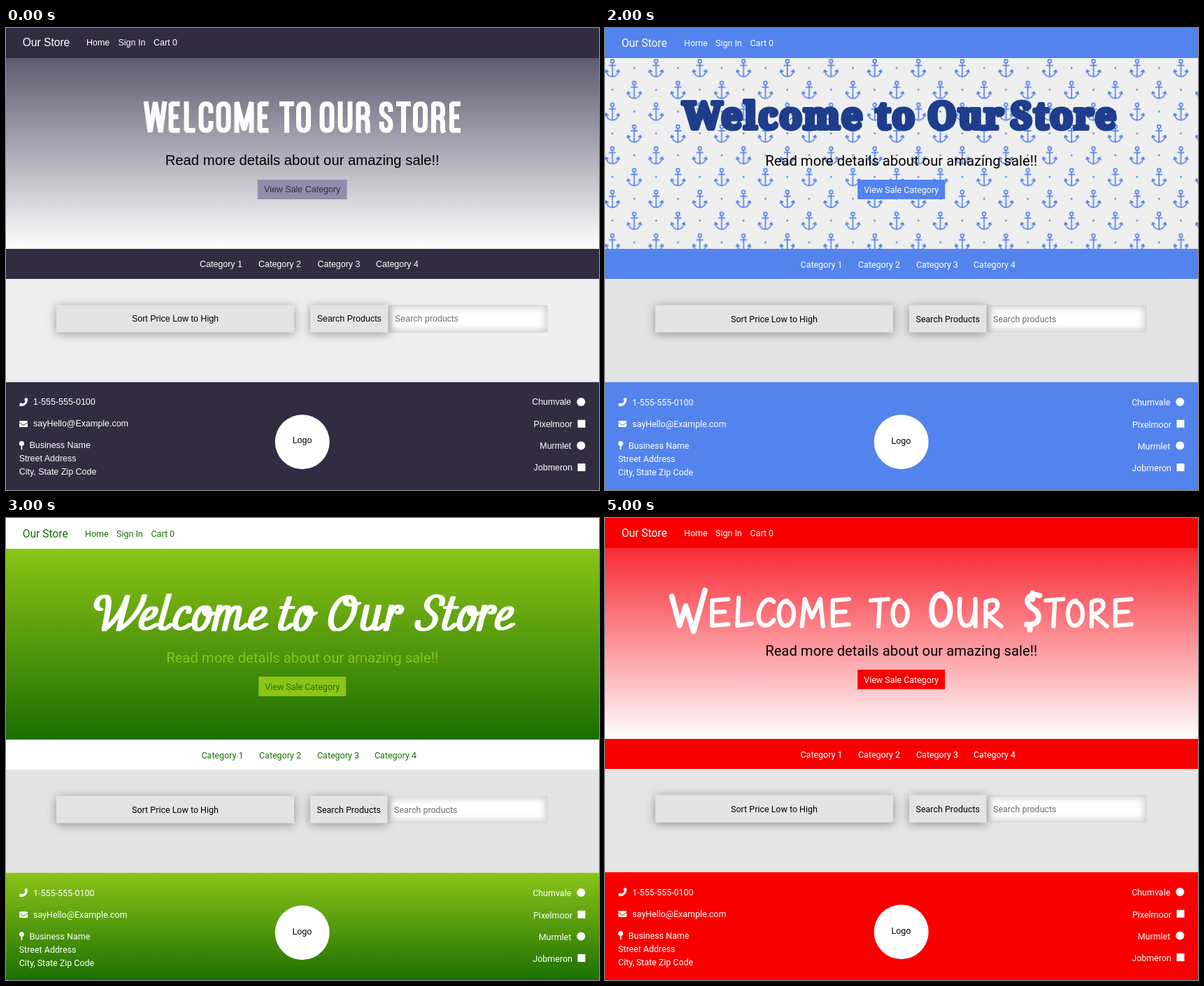
An HTML page that plays this animation: 848 by 661 pixels, repeating every 6000 ms.

```html
<!DOCTYPE html>
<html lang="en">
<head>
<meta charset="utf-8">
<title>Store themes</title>
<style>
html, body { margin: 0; width: 100%; height: 100%; overflow: hidden; background: #fff; }
.theme {
  position: absolute; left: 0; top: 0; width: 848px; height: 661px;
  font-size: 12.48px; opacity: 0;
  animation: turn 6s step-end infinite;
}
@keyframes turn {
  0% { opacity: 1; }
  16.6666%, 100% { opacity: 0; }
}
.helvetica text { transform: translateY(-1px); }
.brand { font-size: 15.6px; }
.lead { font-size: 20.28px; }
.mid { text-anchor: middle; }
.end { text-anchor: end; }
.raised { filter: drop-shadow(0 2px 7px rgba(0, 0, 0, .38)); }
.inset { fill: none; stroke: #d2d2d2; stroke-width: 9px; filter: blur(4px); }
.strokes { fill: none; stroke: #fff; stroke-linejoin: bevel; }
.round { stroke-linecap: round; stroke-linejoin: round; }
.chunky {
  font: 700 53px "Noto Serif", serif; letter-spacing: 2px; fill: #1e3d8c;
  stroke: #1e3d8c; stroke-width: 6px; stroke-linejoin: round;
}
.gears g { filter: drop-shadow(2px 4px 4px #000); }
.grain { mix-blend-mode: overlay; opacity: .55; }
</style>
</head>
<body>
<script>
const { sin, cos, PI, atan2 } = Math;
const TITLE = ['Welcome', 'to', 'Our', 'Store'];
const range = n => [...Array(n).keys()];
const fix = (...v) => v.map(n => n.toFixed(1)).join(' ');
const path = (d, attrs = '') => `<path d="${d}" ${attrs}/>`;
const rect = (x, y, w, h, fill, attrs = '') =>
  `<rect x="${x}" y="${y}" width="${w}" height="${h}" fill="${fill}" ${attrs}/>`;
const circle = (x, y, r, fill, attrs = '') =>
  `<circle cx="${x}" cy="${y}" r="${r}" fill="${fill}" ${attrs}/>`;
const text = (x, y, words, fill, cls = '') =>
  `<text x="${x}" y="${y}" fill="${fill}" class="${cls}">${words}</text>`;
const stops = colors => colors.map((c, i) =>
  `<stop offset="${i / (colors.length - 1)}" stop-color="${c}"/>`).join('');
const fade = (id, ...colors) => `<linearGradient id="${id}" x2="0" y2="1">${stops(colors)}</linearGradient>`;
const glow = (id, ...colors) => `<radialGradient id="${id}">${stops(colors)}</radialGradient>`;

// Lettering: each glyph is [advance, centre line], drawn up from the baseline.
const condensed = {
  W: [35, 'M3 -45L9 -1L16.5 -44L24 -1L30 -45'],
  E: [22, 'M16.5 -41.5H4V-3.5H16.5M4 -23H14.5'],
  L: [21, 'M4 -45V-3.5H16.5'],
  C: [25, 'M18 -28V-33Q18 -41.5 11 -41.5T4 -33V-12Q4 -3.5 11 -3.5T18 -12V-17'],
  O: [26, 'M4 -33Q4 -41.5 11 -41.5T18 -33V-12Q18 -3.5 11 -3.5T4 -12Z'],
  M: [33, 'M4 0V-44L14.5 -4L25 -44V0'],
  T: [23.5, 'M0 -41.5H21M10.5 -41.5V0'],
  U: [26, 'M4 -45V-12Q4 -3.5 11 -3.5T18 -12V-45'],
  R: [26, 'M4 0V-41.5H10Q17 -41.5 17 -33V-30Q17 -22 10 -22H4M10 -22Q17 -22 17 -13V-4L18.5 0'],
  S: [25, 'M17 -30V-33Q17 -41.5 10.5 -41.5T4 -33Q4 -27 10.5 -23T17 -12Q17 -3.5 10.5 -3.5T4 -12V-16']
};
const brush = {
  W: [45, 'M2 -35L11 -2L18 -24L27 5L40 -42'],
  E: [37, 'M27 -40L4 -38V-2L27 -4M4 -21L22 -22'],
  L: [30, 'M5 -42L3 -2L24 -5'],
  C: [30, 'M25 -36C14 -48 0 -24 4 -10C8 2 20 -2 25 -10'],
  O: [32.5, 'M14 -38C-2 -36 0 -2 12 -2C28 -2 28 -38 10 -36'],
  M: [43, 'M3 -1L7 -40L17 -14L29 -40L33 -1'],
  T: [31, 'M2 -38L27 -40M15 -39L13 -1'],
  U: [36, 'M3 -40C0 -8 6 -2 13 -2S26 -14 25 -40V-1'],
  R: [34, 'M4 -1V-36C26 -46 26 -22 6 -18L26 -1'],
  S: [23.5, 'M18 -36C4 -40 0 -28 9 -22C22 -16 18 0 3 -3M10 -39V-32M7 -2V3']
};
const scriptCaps = {
  W: [61, 'M3 -31C-9 -34 -6 -52 7 -50C15 -48 14 -20 15 -2C28 -14 36 -34 37 -50C37 -34 35 -16 36 -2C52 -14 62 -34 61 -51'],
  O: [47, 'M22 -50C0 -48 -1 -2 17 -2C38 -2 42 -48 22 -50C16 -40 24 -34 39 -40'],
  S: [36, 'M31 -38C34 -54 11 -55 10 -40C10 -26 29 -28 27 -13C25 1 1 2 3 -14']
};
const scriptLower = {
  e: [27, 'M5 -16C18 -17 22 -24 21 -30C19 -37 7 -34 5 -19C3 -2 14 1 27 -10'],
  l: [21, 'M8 -52L6 -12C6 0 14 -1 21 -10'],
  c: [27, 'M21 -27C22 -38 7 -38 5 -18C4 -2 15 1 27 -10'],
  o: [31, 'M16 -35C2 -35 2 -2 14 -2C27 -2 28 -35 16 -35C15 -24 22 -20 30 -26'],
  m: [50, 'M5 -36V-2M5 -20C9 -38 20 -40 20 -26V-2M20 -20C24 -38 36 -40 35 -24V-10C35 0 43 -1 50 -10'],
  t: [21, 'M9 -48L6 -12C5 0 14 0 21 -10M2 -34H17'],
  u: [35, 'M5 -36V-13C5 1 17 0 22 -10M22 -36V-12C22 0 29 0 35 -10'],
  r: [24, 'M5 -36V-2M5 -18C8 -36 16 -40 20 -32C21 -27 18 -25 16 -27']
};

function letters(glyphs, starts, initial = 1) {
  return TITLE.map((word, i) => {
    let x = starts[i];
    return [...word].map(c => {
      const size = c < 'a' ? initial : 1;
      const [advance, d] = glyphs[c] || glyphs[c.toUpperCase()];
      const shape = path(d, `transform="translate(${x}) scale(${size})"`);
      x += advance * size;
      return shape;
    }).join('');
  }).join('');
}
const lettering = (place, width, body, cls = '') =>
  `<g role="img" aria-label="${TITLE.join(' ')}" class="strokes ${cls}" stroke-width="${width}" transform="${place}">${body}</g>`;

const condensedTitle = place => lettering(place, 7, letters(condensed, [0, 194, 251, 336]));
const brushTitle = lettering('translate(93 156)', 6.2, letters(brush, [0, 285, 371, 506], 1.25), 'round');
// A broad nib: the same thin line repeated sideways.
const nibLine = letters({ ...scriptCaps, ...scriptLower }, [1, 261, 332, 459]);
const scriptTitle = lettering('translate(124 161) skewX(-13)', 4,
  [-2, 0, 2].map(dx => `<g transform="translate(${dx})">${nibLine}</g>`).join(''), 'round');
const chunkyTitle = [111, 387, 461, 580].map((x, i) => `<text class="chunky" x="${x}" y="144">${TITLE[i]}</text>`).join('');

// Foliage
function leaflet(x, y, a, len, w, bend) {
  const mx = x + cos(a) * len * .45, my = y + sin(a) * len * .45;
  const tip = fix(x + cos(a + bend) * len, y + sin(a + bend) * len);
  const dx = -sin(a) * w, dy = cos(a) * w;
  return `M${fix(x, y)}Q${fix(mx + dx, my + dy)} ${tip}Q${fix(mx - dx, my - dy, x, y)}`;
}
const blades = (d, fill) => path(d, `fill="${fill}" stroke="#7c8a3c" stroke-width=".5"`);
function frond([x0, y0], [x1, y1], [x2, y2], n, len, spread, near, far = near) {
  const side = s => range(n).map(i => {
    const t = i / (n - 1), u = 1 - t;
    const x = u * u * x0 + 2 * u * t * x1 + t * t * x2;
    const y = u * u * y0 + 2 * u * t * y1 + t * t * y2;
    const a = atan2(u * (y1 - y0) + t * (y2 - y1), u * (x1 - x0) + t * (x2 - x1));
    return leaflet(x, y, a + s * spread, len * (.55 + .45 * sin(PI * t)), 6.5, -s * .15);
  }).join('');
  return blades(side(-1), near) + blades(side(1), far) +
    path(`M${x0} ${y0}Q${x1} ${y1} ${x2} ${y2}`, 'fill="none" stroke="#a3a948" stroke-width="3"');
}
const fan = (x, y, from, to, n, len, fill) =>
  blades(range(n).map(i => leaflet(x, y, from + (to - from) * i / (n - 1), len * (1 - .2 * (i % 2)), 9, .12)).join(''), fill);
function monstera(x, y, size, turn, fill, gapFill) {
  const sides = range(5).flatMap(k => [-1, 1].map(s => [s, k * .36 - .75]));
  const slits = sides.map(([s, v]) => {
    const inner = s * .42, lift = v - .16;
    return `M${fix(s * 1.2, v + .2)}Q${s * .7} ${v + .02} ${inner} ${lift}Q${s * .7} ${v - .14} ${s * 1.2} ${v + .02}Z`;
  }).join('');
  const veins = sides.map(([s, v]) => `M0 ${v - .1}Q${s * .45} ${v - .05} ${s * .85} ${v + .2}`).join('');
  return `<g transform="translate(${x} ${y}) rotate(${turn}) scale(${size})">` +
    path('M0 -.55C.3 -1 1 -.8 1 -.1C1 .5 .4 .8 0 1.1C-.4 .8 -1 .5 -1 -.1C-1 -.8 -.3 -1 0 -.55Z', `fill="${fill}"`) +
    path(slits, `fill="${gapFill}"`) +
    path('M0 -.55V1' + veins, 'fill="none" stroke="#8aa873" stroke-opacity=".5" stroke-width=".015"') + '</g>';
}
const jungle = `<linearGradient id="pink">${stops(['#f8eef0', '#f1cfd6', '#e3a9b6', '#c98494', '#a9636f'])}</linearGradient>` +
  glow('glossy', '#5f8a48', '#2f5a20', '#152c0b') + glow('shady', '#3a4a20', '#26350f', '#141f08') +
  rect(0, 43, 848, 273, 'url(#pink)') +
  frond([520, 330], [680, 220], [860, 120], 16, 130, .8, '#a0586a') +
  monstera(560, 62, 88, 68, 'url(#shady)', '#d893a3') +
  monstera(745, 95, 125, 25, 'url(#shady)', '#b87484') +
  monstera(15, 290, 80, 40, 'url(#glossy)', '#f0dce0') +
  monstera(115, 255, 108, -28, 'url(#glossy)', '#efd0d5') +
  monstera(795, 318, 66, 100, 'url(#glossy)', '#b87484') +
  monstera(690, 308, 46, -70, 'url(#glossy)', '#c98494') +
  fan(345, 165, 3.35, 4.3, 15, 290, '#46561f') +
  frond([228, 30], [290, 110], [365, 205], 15, 170, .75, '#3b4b18', '#66742f') +
  fan(338, 165, 1.3, 2.7, 20, 180, '#26310f') +
  frond([385, 335], [355, 250], [335, 160], 14, 85, 2.2, '#2b3611') +
  frond([400, 215], [600, 268], [860, 318], 28, 235, .9, '#33451a', '#4d5e22');

// Nautical wallpaper
const anchor = (x, y) => `<g transform="translate(${x} ${y})" fill="none" stroke="#5383ec" stroke-width="1.7">` +
  circle(0, -10, 2.4, 'none') +
  path('M0 -7.5V12M-5 -4H5M-9 3C-8 15 8 15 9 3M-10.5 6L-9 2.5L-5.5 5M10.5 6L9 2.5L5.5 5') + '</g>';
const dot = (x, y) => rect(x - 1.2, y - 1.2, 2.4, 2.4, '#5383ec');
const anchors = `<pattern id="anchors" x="-5.1" y="42" width="62.54" height="62.4" patternUnits="userSpaceOnUse">` +
  anchor(15.6, 15.6) + anchor(46.9, 46.8) + dot(46.9, 15.2) + dot(15.6, 46.4) + '</pattern>' +
  rect(0, 43, 848, 273, '#efefef') + rect(0, 43, 848, 273, 'url(#anchors)');

// Machinery
const ring = (x, y, r) => `M${fix(x - r, y)}a${r} ${r} 0 1 0 ${2 * r} 0a${r} ${r} 0 1 0 ${-2 * r} 0z`;
function gear(x, y, r, teeth, { holes = 0, spokes = 0, fill = 'url(#metal)' } = {}) {
  const rim = range(teeth * 4).map(i => {
    const a = PI * (i + .5) / (2 * teeth), q = i % 4 < 2 ? r : r * .87;
    return fix(x + q * cos(a), y + q * sin(a));
  }).join('L');
  const cuts = range(holes).map(i => {
    const a = 2 * PI * i / holes - 2.3;
    return ring(x + r * .5 * cos(a), y + r * .5 * sin(a), r * .19);
  }).join('');
  const arms = range(spokes).map(i => {
    const a = 2 * PI * i / spokes + .2;
    return `M${fix(x, y)}L${fix(x + r * .74 * cos(a), y + r * .74 * sin(a))}`;
  }).join('');
  return '<g>' + (holes ? circle(x, y, r * .75, '#0c0b0b') : '') +
    path(`M${rim}Z` + cuts + (spokes ? ring(x, y, r * .72) : ''),
      `fill="${fill}" fill-rule="evenodd" stroke="#7d7975" stroke-width=".7"`) +
    path(arms, `stroke="#55524f" stroke-width="${r * .075}"`) +
    circle(x, y, r * .8, 'none', 'stroke="#2b2927" stroke-width="2"') +
    circle(x, y, r * .2, '#55524f', 'stroke="#1f1d1c" stroke-width="2"') +
    circle(x, y, r * .09, '#474441', 'stroke="#888" stroke-width=".7"') + '</g>';
}
const machine = glow('metal', '#65615e', '#4f4c49', '#3b3836') +
  `<filter id="rust"><feTurbulence type="fractalNoise" baseFrequency=".06" numOctaves="4" seed="3"/>
    <feColorMatrix values="2.4 0 0 0 -.75  2.4 0 0 0 -.75  2.4 0 0 0 -.75  0 0 0 0 1"/></filter>
  <pattern id="plate" width="18" height="18" patternUnits="userSpaceOnUse">` +
  rect(0, 0, 18, 18, '#2a2928') + circle(5, 5, 3.8, '#0c0c0c', 'stroke="#4b4947"') +
  circle(14, 14, 3.8, '#0c0c0c', 'stroke="#4b4947"') + '</pattern>' +
  rect(0, 43, 848, 273, '#131211') + rect(590, 43, 258, 273, 'url(#plate)') + '<g class="gears">' +
  gear(165, 75, 70, 24, { spokes: 6, fill: '#2c2a28' }) + gear(60, 250, 75, 26, { spokes: 5, fill: '#2a2826' }) +
  gear(470, 90, 85, 30, { holes: 5, fill: '#2c2a28' }) +
  gear(378, 42, 132, 40, { spokes: 7 }) +
  gear(230, 185, 48, 18, { fill: '#3b3836' }) +
  gear(655, 30, 55, 18, { holes: 5 }) + gear(838, 25, 68, 20) +
  gear(690, 305, 58, 20, { spokes: 5, fill: '#514039' }) +
  gear(92, 145, 122, 40, { spokes: 9 }) + gear(8, 290, 55, 18, { holes: 5 }) +
  gear(720, 142, 66, 22, { holes: 6 }) + gear(824, 263, 98, 34, { spokes: 10 }) +
  gear(313, 262, 75, 22, { holes: 4 }) + gear(210, 268, 57, 16) +
  gear(543, 262, 108, 30, { holes: 5 }) + '</g>' +
  rect(0, 43, 848, 273, '#888', 'class="grain" filter="url(#rust)"');

const fadeHero = (id, from, to) => fade(id, from, to) + rect(0, 43, 848, 273, `url(#${id})`);

const roboto = { family: 'Roboto, sans-serif', nav: [113, 158, 207.5], cats: [279.5, 362, 445, 527], btn: 125, search: 110.5 };
const helvetica = { family: "'Liberation Sans', sans-serif", nav: [115, 160.5, 211], cats: [277, 361, 445.5, 529], btn: 128, search: 111.5, cls: 'helvetica' };

const themes = [
  { face: helvetica, bar: '#322c42', panel: '#efefef', hero: fadeHero('dusk', '#5d5a70', '#fff'),
    title: condensedTitle('translate(197 150)'), btn: '#928dac', btnInk: '#322c42' },
  { bar: '#0e2806', panel: '#e9e9e9', hero: jungle, title: scriptTitle, catInk: '#f3abb5', drop: 9 },
  { bar: '#5383ec', panel: '#e4e4e4', hero: anchors, title: chunkyTitle },
  { bar: '#fff', ink: '#186f00', panel: '#e4e4e4', hero: fadeHero('lime', '#8cc418', '#1a6e00'), foot: 'url(#lime)',
    title: scriptTitle, lead: '#8cc418', btn: '#8cc418', btnInk: '#1e6f00', drop: 9, shift: 1 },
  { bar: '#6b6b6b', panel: '#e9e9e9', hero: machine, title: condensedTitle('translate(169 157) scale(1.123)'), lead: '#fff', drop: 9 },
  { bar: '#f80000', panel: '#e5e5e5', hero: fadeHero('blush', '#f92a35', '#fff'), title: brushTitle }
];

function form(face) {
  const edge = 435 + face.search;
  return `<svg x="${edge}" y="396.5" width="${774.5 - edge}" height="39">` +
    rect(0, 0, '100%', 39, '#fff', 'rx="3"') +
    '<rect class="inset" width="100%" height="39" rx="3"/>' +
    rect(.5, .5, 773.5 - edge, 38, 'none', 'rx="3" stroke="#ccd0d3"') + '</svg>' +
    rect(72, 396.5, 340, 39, '#e4e4e5', 'class="raised"') +
    rect(435, 396.5, face.search, 39, '#e4e4e5', 'class="raised"') +
    text(242, 420.5, 'Sort Price Low to High', '#000', 'mid') +
    text(435 + face.search / 2, 420.5, 'Search Products', '#000', 'mid') +
    text(edge + 9.5, 421.4, 'Search products', '#656d75');
}

function footer(fill) {
  const social = ['Chumvale', 'Pixelmoor', 'Murmlet', 'Jobmeron'];
  return rect(0, 506.7, 848, 156, fill) +
    path('M19 537.8l3.2-1.6 1.6 1.6q3-1.6 4-4l-1.6-1.6 1.4-3.2 3.4.9q.6 10.6-11.2 11.4z', 'fill="#fff"') +
    rect(19, 562, 12, 9, '#fff', 'rx="1.3"') +
    path('M19 564.5l6 3.8 6-3.8', `fill="none" stroke="${fill}"`) +
    circle(22.4, 594.6, 3.5, '#fff') + rect(21.6, 597, 1.7, 6.3, '#fff') +
    text(39, 540.3, '1-555-555-0100', '#fff') +
    text(39, 571.4, 'sayHello@Example.com', '#fff') +
    ['Business Name', 'Street Address', 'City, State Zip Code'].map((line, i) =>
      text(i ? 18.7 : 33.5, 602.4 + i * 18.8, line, '#fff')).join('') +
    circle(423.7, 592.2, 39, '#fff') + text(423.5, 594.7, 'Logo', '#000', 'mid') +
    social.map((name, i) => {
      const y = 535 + i * 31.2;
      return text(i % 2 ? 810 : 808.3, y + 5.3, name, '#fff', 'end') +
        (i % 2 ? rect(817.5, y - 5.5, 11, 11, '#fff') : circle(822.3, y, 6, '#fff'));
    }).join('');
}

function page({ face = roboto, bar, ink = '#fff', catInk = ink, panel, hero, title, lead = '#000',
  btn = bar, btnInk = '#fff', foot = bar, drop = 0, shift = 0 }, i) {
  return `<svg class="theme ${face.cls || ''}" viewBox="0 0 848 661" font-family="${face.family}" style="animation-delay:${i - 6}s">
    <g transform="translate(0 ${shift})">` +
    rect(0, -2, 848, 663, panel) + rect(0, -2, 848, 45, bar) +
    text(23.7, 27.4, 'Our Store', ink, 'brand') +
    ['Home', 'Sign In', 'Cart 0'].map((item, k) => text(face.nav[k], 25.8, item, ink)).join('') +
    `<svg y="43" width="848" height="273" viewBox="0 43 848 273">${hero}</svg>` + title +
    text(423.7, 196.7 + drop, 'Read more details about our amazing sale!!', lead, 'lead mid') +
    rect(423.7 - face.btn / 2, 217 + drop, face.btn, 28, btn) +
    text(423.7, 235.5 + drop, 'View Sale Category', btnInk, 'mid') +
    rect(0, 316, 848, 43, bar) +
    face.cats.map((x, k) => text(x, 342.8, `Category ${k + 1}`, catInk)).join('') +
    form(face) + footer(foot) + '</g></svg>';
}

document.body.innerHTML = themes.map(page).join('');
</script>
</body>
</html>
```
